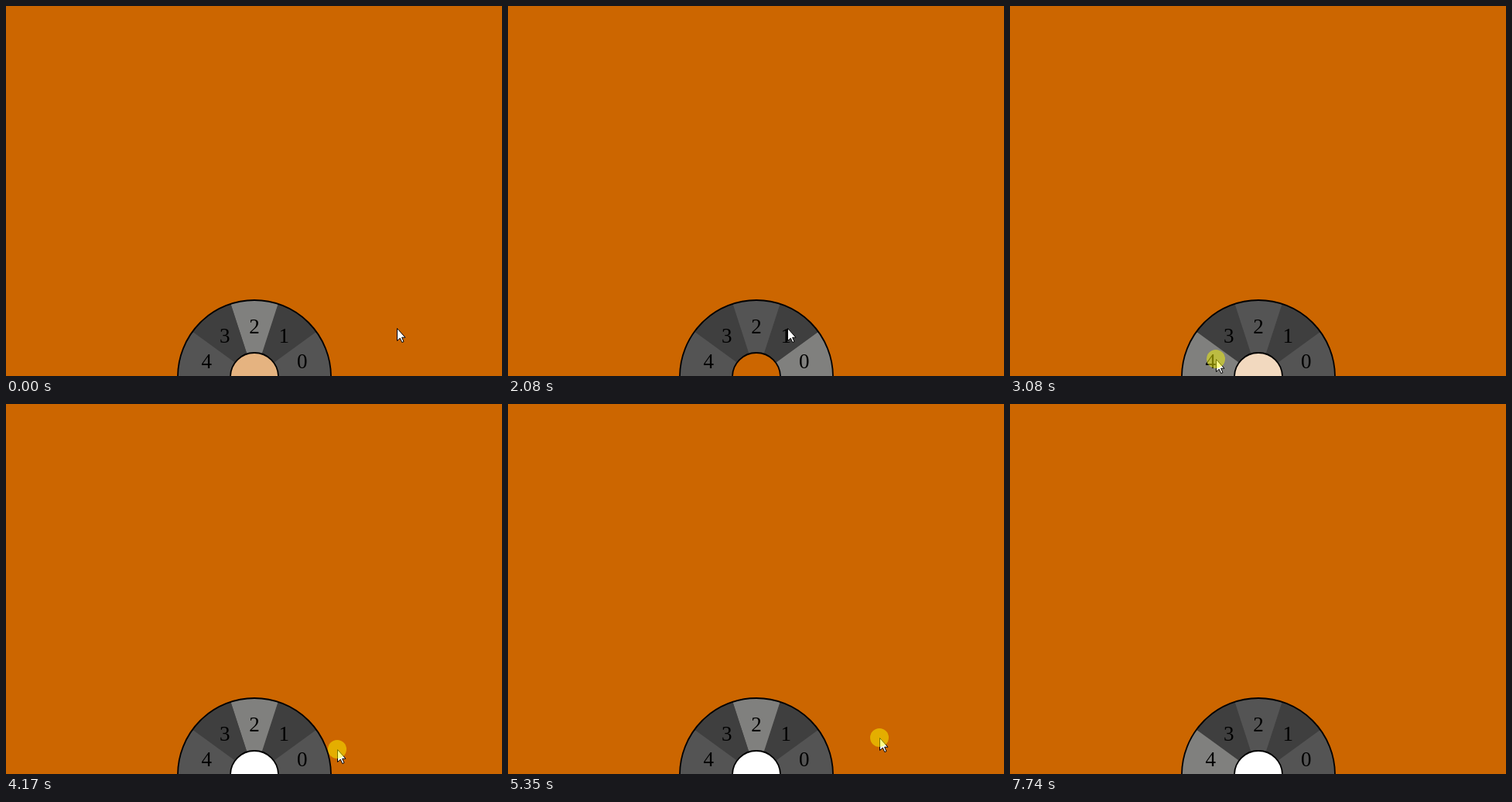
Animation of 641x478 px, one loop 8290 ms. Source, as an HTML page:

```html
<!DOCTYPE html>
<html lang="en">
<head>
<meta charset="utf-8">
<title>Radial selector</title>
<style>
  html, body { margin: 0; width: 100%; height: 100%; overflow: hidden; background: #c60; }
  svg { display: block; width: 100%; height: 100%; }
  text { font: 27px "Liberation Serif", serif; text-anchor: middle; }
</style>
</head>
<body>
<svg viewBox="0 0 641 478">
  <rect width="641" height="478" fill="#c60"/>
  <circle cx="321" cy="479" r="99" fill="#4a4a4a"/>
  <g id="wheel"></g>
  <circle cx="321" cy="479" r="99" fill="none" stroke="#000" stroke-width="1.8"/>
  <circle cx="321" cy="479" r="31" fill="#c60"/>
  <circle id="hub" cx="321" cy="479" r="31" fill="#fff"/>
  <circle cx="321" cy="479" r="31" fill="none" stroke="#000" stroke-width="1.8"/>
  <g id="pointer">
    <path d="M.5 .5V16.5L4.3 13.2L6.8 18.6L9 17.6L6.6 12.2H11Z" fill="#fff" stroke="#000"/>
    <circle id="ring" r="12" fill="#ff0" fill-opacity=".47"/>
  </g>
</svg>
<script>
const LOOP = 8290, TICK = 77.4;
const CX = 321, CY = 479, OUTER = 99, INNER = 31, LABEL = 65;
const COUNT = 5, SPAN = 180 / COUNT, DEFAULT = 2;

const $ = id => document.getElementById(id);
const wheel = $('wheel'), hub = $('hub'), pointer = $('pointer'), ring = $('ring');

const polar = (deg, r) => {
  const a = deg * Math.PI / 180;
  return [CX + r * Math.cos(a), CY - r * Math.sin(a)];
};
const baseFill = i => i % 2 ? '#3f3f3f' : '#545454';

function add(tag, attrs, text = '') {
  const el = document.createElementNS('http://www.w3.org/2000/svg', tag);
  for (const key in attrs) el.setAttribute(key, attrs[key]);
  el.textContent = text;
  return wheel.appendChild(el);
}

const segments = Array.from({ length: COUNT }, (_, i) => {
  const from = i * SPAN, to = from + SPAN;
  const d = `M${polar(from, INNER)}L${polar(from, OUTER)}` +
    `A${OUTER} ${OUTER} 0 0 0 ${polar(to, OUTER)}L${polar(to, INNER)}` +
    `A${INNER} ${INNER} 0 0 1 ${polar(from, INNER)}Z`;
  return add('path', { d });
});
segments.forEach((_, i) => {
  const [x, y] = polar((i + 0.5) * SPAN, LABEL);
  add('text', { x, y: y + 9 }, i);
});

// One state per tick, recorded by acting out the demo.
const frames = [];
let x = 505, y = 416, held = false, fromWheel = false;
let pick = DEFAULT, value = DEFAULT;

const radius = () => Math.hypot(x - CX, y - CY);

function record() {
  if (held) {
    const r = radius();
    if (r > OUTER) pick = fromWheel ? DEFAULT : pick;
    else if (r > INNER) pick = Math.floor(Math.atan2(CY - y, x - CX) * 180 / Math.PI / SPAN);
  } else value = pick;
  frames.push({ x: Math.round(x), y: Math.round(y), held, pick, value });
}

function move(ticks, toX, toY, bow = 0) {
  const x0 = x, y0 = y;
  for (let i = 1; i <= ticks; i++) {
    const p = i / ticks;
    x = x0 + (toX - x0) * p;
    y = y0 + (toY - y0) * p + bow * Math.sin(Math.PI * p);
    record();
  }
}

const wait = ticks => move(ticks, x, y);
const press = ticks => { held = true; fromWheel = radius() < OUTER; wait(ticks); };
const release = ticks => { held = false; wait(ticks); };
const click = (down, up) => { press(down); release(up); };

function act() {
  record();
  // Drag in from outside onto 4
  move(7, 231, 329, -32);
  press(2);
  move(2, 233, 433);
  move(3, 249, 453);
  wait(1);
  release(2);
  // Click 0 to 4 in turn
  move(4, 375, 452, -6);
  wait(1);
  click(1, 1);
  move(3, 361, 416);
  click(2, 2);
  move(2, 322, 404);
  click(1, 1);
  move(1, 283, 418);
  click(1, 1);
  move(1, 266, 456);
  click(2, 1);
  // Drag across to 0, then out and back in
  press(1);
  move(3, 395, 460);
  wait(7);
  move(1, 428, 446);
  move(1, 463, 440);
  wait(3);
  move(2, 400, 452);
  wait(1);
  move(2, 458, 442);
  wait(1);
  move(2, 400, 450);
  wait(1);
  move(2, 480, 431);
  wait(3);
  release(3);
  // Click 4, click outside, leave
  move(7, 245, 449);
  click(2, 2);
  move(5, 203, 310);
  wait(3);
  click(1, 1);
  move(4, 600, 500);
}
act();

function render(ms) {
  const tick = Math.floor(ms / TICK + 0.25);
  const f = frames[Math.min(tick, frames.length - 1)];
  segments.forEach((s, i) => s.setAttribute('fill', i === f.pick ? '#80807e' : baseFill(i)));
  hub.setAttribute('fill-opacity', f.value / (COUNT - 1));
  pointer.setAttribute('transform', `translate(${f.x} ${f.y})`);
  ring.setAttribute('visibility', f.held ? 'visible' : 'hidden');
}

const start = performance.now();
function loop() {
  render((performance.now() - start) % LOOP);
  requestAnimationFrame(loop);
}
loop();
</script>
</body>
</html>
```
